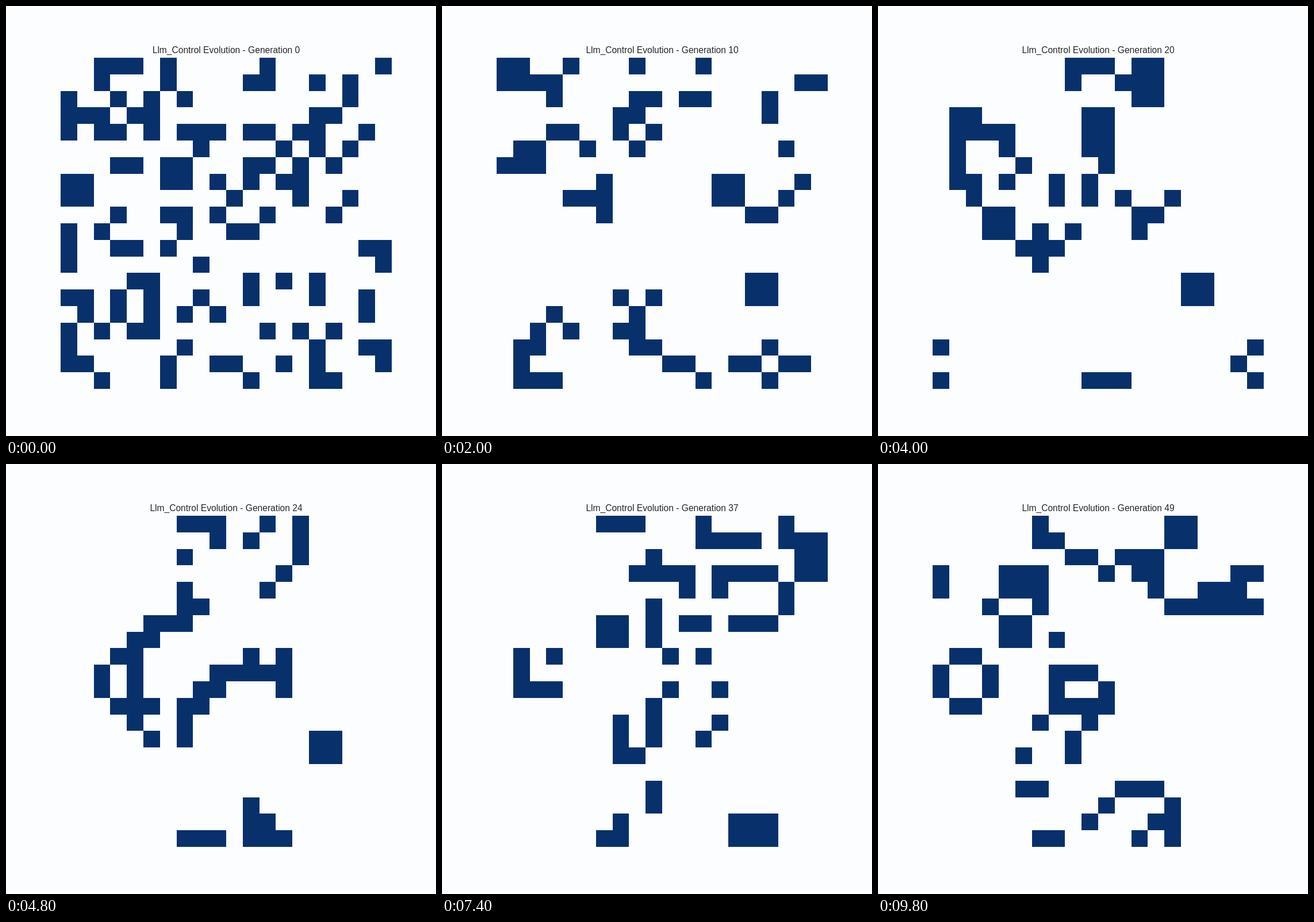
Recreate the animation shown at these times as an HTML page. Size 748 by 748 pixels, loop 10 s.

```html
<!DOCTYPE html>
<html lang="en">
<head>
<meta charset="utf-8">
<title>Llm_Control Evolution</title>
<style>
  html, body { margin: 0; width: 100%; height: 100%; overflow: hidden; background: #fcfdff; }
  svg { display: block; width: 100%; height: 100%; }
  text { font: 15.6px "Liberation Sans", Arial, sans-serif; fill: #262626; text-anchor: middle; }
  path { fill: #08306b; shape-rendering: crispEdges; }
</style>
</head>
<body>
<svg viewBox="0 0 748 748">
  <text id="title" x="383" y="82.2"></text>
  <path id="cells"/>
</svg>
<script>
const SIZE = 20, LEFT = 95, TOP = 90, CELL = 28.8;
const STEP_MS = 200, STEPS = 50;

// Live columns of each row in the first generation.
const SEED = [
  '2 3 4 6 12 19', '2 6 11 12 15 17', '0 3 5 7 17', '0 1 2 4 5 15 16',
  '0 2 3 5 7 8 9 11 12 14 15 18', '8 13 15 17', '3 4 6 7 11 12 14 16', '0 1 6 7 9 11 13 14',
  '0 1 10 14 17', '3 6 7 9 12 16', '0 2 7 10 11', '0 3 4 6 18 19',
  '0 8 19', '4 5 11 13 15', '0 1 3 5 8 11 15 18', '1 3 5 7 9 18',
  '0 2 4 5 12 14 16', '0 7 15 18 19', '0 1 6 9 10 13 15 19', '2 6 11 15 16'
];

const wrap = n => (n + SIZE) % SIZE;
const edge = (start, i) => Math.round(start + CELL * i);

function parse(rows) {
  return rows.map(row => {
    const line = Array(SIZE).fill(0);
    row.split(' ').forEach(x => { line[x] = 1; });
    return line;
  });
}

// Conway's rule on a torus; the sum includes the cell itself.
function evolve(grid) {
  return grid.map((row, y) => row.map((alive, x) => {
    let sum = 0;
    for (let dy = -1; dy <= 1; dy++)
      for (let dx = -1; dx <= 1; dx++)
        sum += grid[wrap(y + dy)][wrap(x + dx)];
    return sum === 3 || (alive && sum === 4) ? 1 : 0;
  }));
}

function outline(grid) {
  let d = '';
  grid.forEach((row, y) => row.forEach((alive, x) => {
    if (alive) d += `M${edge(LEFT, x)} ${edge(TOP, y)}H${edge(LEFT, x + 1)}V${edge(TOP, y + 1)}H${edge(LEFT, x)}Z`;
  }));
  return d;
}

const paths = [];
for (let grid = parse(SEED); paths.length < STEPS; grid = evolve(grid)) paths.push(outline(grid));

const title = document.getElementById('title');
const cells = document.getElementById('cells');
let shown = -1;

function draw(ms) {
  const gen = Math.floor(ms / STEP_MS) % STEPS;
  if (gen === shown) return;
  shown = gen;
  title.textContent = `Llm_Control Evolution - Generation ${gen}`;
  cells.setAttribute('d', paths[gen]);
}

const start = performance.now();
function tick() {
  draw(performance.now() - start);
  requestAnimationFrame(tick);
}
tick();
</script>
</body>
</html>
```
